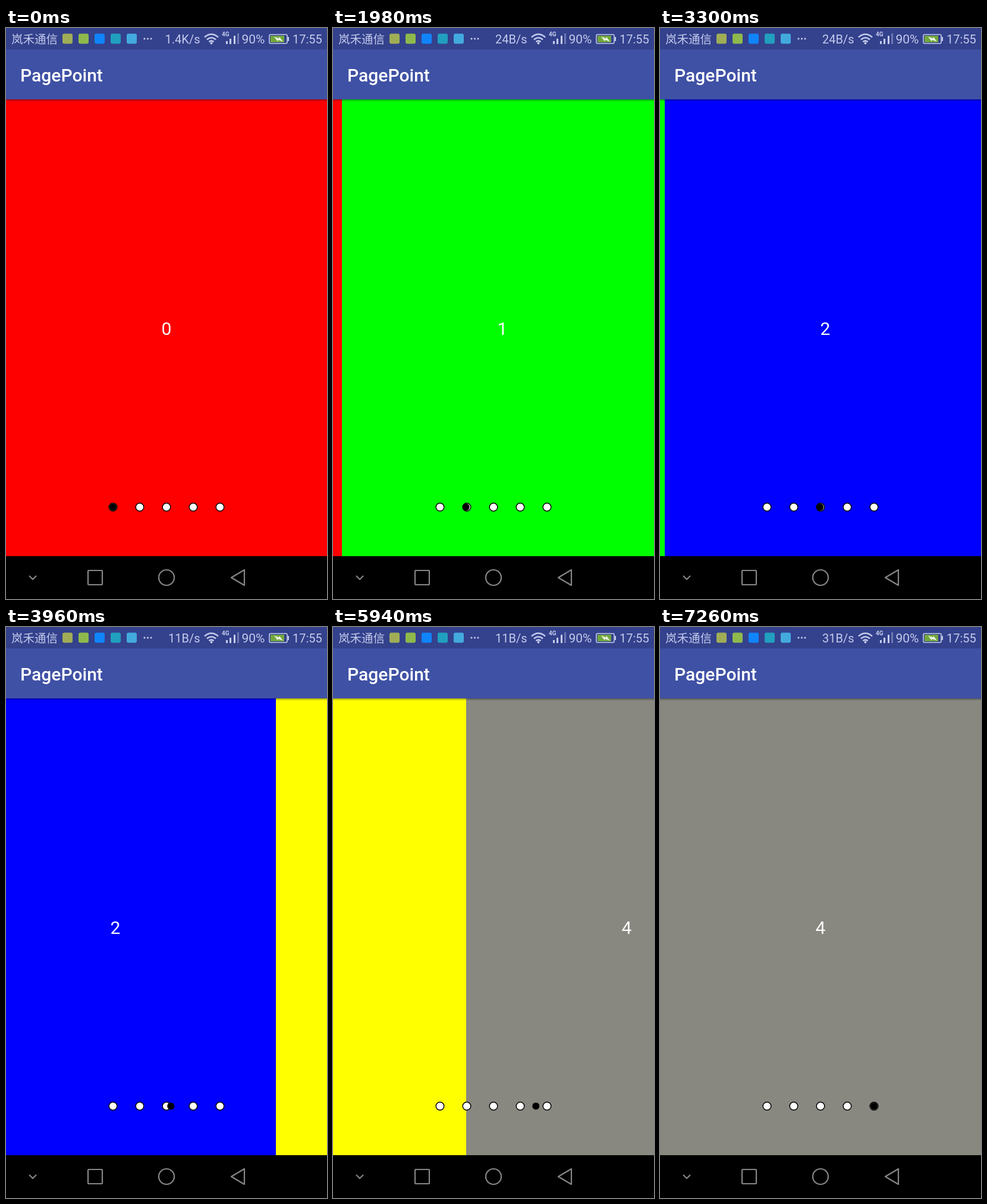
An HTML page that plays this animation: 540x960 px, repeating every 7590 ms.

```html
<!DOCTYPE html>
<html lang="zh-CN">
<head>
<meta charset="utf-8">
<title>PagePoint</title>
<style>
  html, body { margin: 0; width: 100%; height: 100%; overflow: hidden; background: #000; }
  svg { display: block; width: 540px; height: 960px; font-family: Roboto, "Noto Sans CJK SC", "Noto Sans CJK", sans-serif; }
  .status { fill: #c3cbed; font-size: 20px; }
  .line { fill: none; stroke: #c3cbed; stroke-width: 2.6; }
  .nav { fill: none; stroke: #868686; stroke-width: 2.2; }
</style>
</head>
<body>
<svg viewBox="0 0 540 960">
  <defs>
    <linearGradient id="shade" x2="0" y2="1">
      <stop stop-opacity=".35"/><stop offset="1" stop-opacity="0"/>
    </linearGradient>
  </defs>

  <g id="pages" font-size="30" fill="#fff" text-anchor="middle"></g>
  <g id="dots" fill="#fff" stroke="#000" stroke-width="1.5"></g>
  <circle id="marker" cy="805.5" r="6"/>

  <rect width="540" height="36" fill="#34418c"/>
  <rect y="36" width="540" height="84" fill="#3f51a5"/>
  <rect y="120" width="540" height="4" fill="url(#shade)"/>
  <text x="24" y="90" font-size="30" font-weight="500" fill="#fff">PagePoint</text>

  <g class="status">
    <text x="9" y="26" font-size="19.5">岚禾通信</text>
    <g id="icons"></g>
    <circle cx="233" cy="18" r="1.6"/><circle cx="238.5" cy="18" r="1.6"/><circle cx="244" cy="18" r="1.6"/>
    <text id="speed" x="326.5" y="26" text-anchor="end"></text>
    <path class="line" d="M334 15.5Q345.5 5.5 357 15.5M338 19.5Q345.5 13 353 19.5M341.5 23.2Q345.5 20 349.5 23.2"/>
    <circle cx="345.5" cy="25.5" r="2"/>
    <text x="363" y="14" style="font-size:10px;font-weight:700">4G</text>
    <path d="M370 22h3v5h-3zM376 18h3v9h-3zM383 13h3v14h-3z"/>
    <path d="M389 9h3v18h-3z" opacity=".4"/>
    <text x="396.5" y="26" style="font-size:21px">90%</text>
    <rect class="line" x="443" y="11" width="30" height="15" rx="2" style="stroke-width:1.6"/>
    <path d="M474 15h2v7h-2z"/>
    <path d="M445 13h23v11h-23z" fill="#72a83c"/>
    <path d="M451 14.5l8 3 1-2.5 6 8-8-3-1 2.5z" fill="#eef4e4"/>
    <text x="482" y="26">17:55</text>
  </g>

  <path d="M0 888h540v72H0z"/>
  <g class="nav">
    <path d="M39 921l6 6 6-6"/>
    <rect x="138" y="912" width="24" height="24" rx="1"/>
    <circle cx="270" cy="924" r="13"/>
    <path d="M379 924l22-13v26z" stroke-linejoin="round"/>
  </g>
</svg>
<script>
const LOOP = 7590, STEP = 330, WIDTH = 540, GAP = 45;
const pageColors = ['#f00', '#0f0', '#00f', '#ff0', '#888880'];
const iconColors = ['#a0ad56', '#8fb94c', '#1084fa', '#219fbe', '#43aade'];
// Swipe positions: [time in ms, page]
const swipes = [
  [0, 0], [990, 0], [1320, .187], [1650, .7], [1980, .972], [2310, 1], [2640, 1.12],
  [2970, 1.72], [3300, 1.985], [3630, 2], [3960, 2.16], [4290, 2.8], [4620, 3],
  [4950, 3.131], [6600, 3.887], [6930, 3.99], [7260, 4], [LOOP, 4]
];
const $ = id => document.getElementById(id);

$('pages').innerHTML = pageColors.map((color, i) =>
  `<rect x="${i * WIDTH}" y="120" width="${WIDTH}" height="768" fill="${color}"/>
   <text x="${i * WIDTH + 270}" y="516">${i}</text>`).join('');
$('dots').innerHTML = pageColors.map((_, i) =>
  `<circle cx="${180 + i * GAP}" cy="805.5" r="6.8"/>`).join('');
$('icons').innerHTML = iconColors.map((color, i) =>
  `<rect x="${95 + i * 27}" y="9.5" width="17" height="17" rx="3" fill="${color}"/>`).join('');

function pageAt(t) {
  const next = swipes.findIndex(([time]) => time > t);
  const [t0, p0] = swipes[next - 1], [t1, p1] = swipes[next];
  return p0 + (p1 - p0) * (t - t0) / (t1 - t0);
}

function draw() {
  const t = Math.floor(performance.now() % LOOP / STEP) * STEP;
  const page = pageAt(t);
  $('pages').setAttribute('transform', `translate(${-Math.round(page * WIDTH)})`);
  $('marker').setAttribute('cx', 180 + page * GAP);
  $('speed').textContent = t < 990 ? '1.4K/s' : t < 3960 ? '24B/s' : t < 6930 ? '11B/s' : '31B/s';
  requestAnimationFrame(draw);
}
draw();
</script>
</body>
</html>
```
